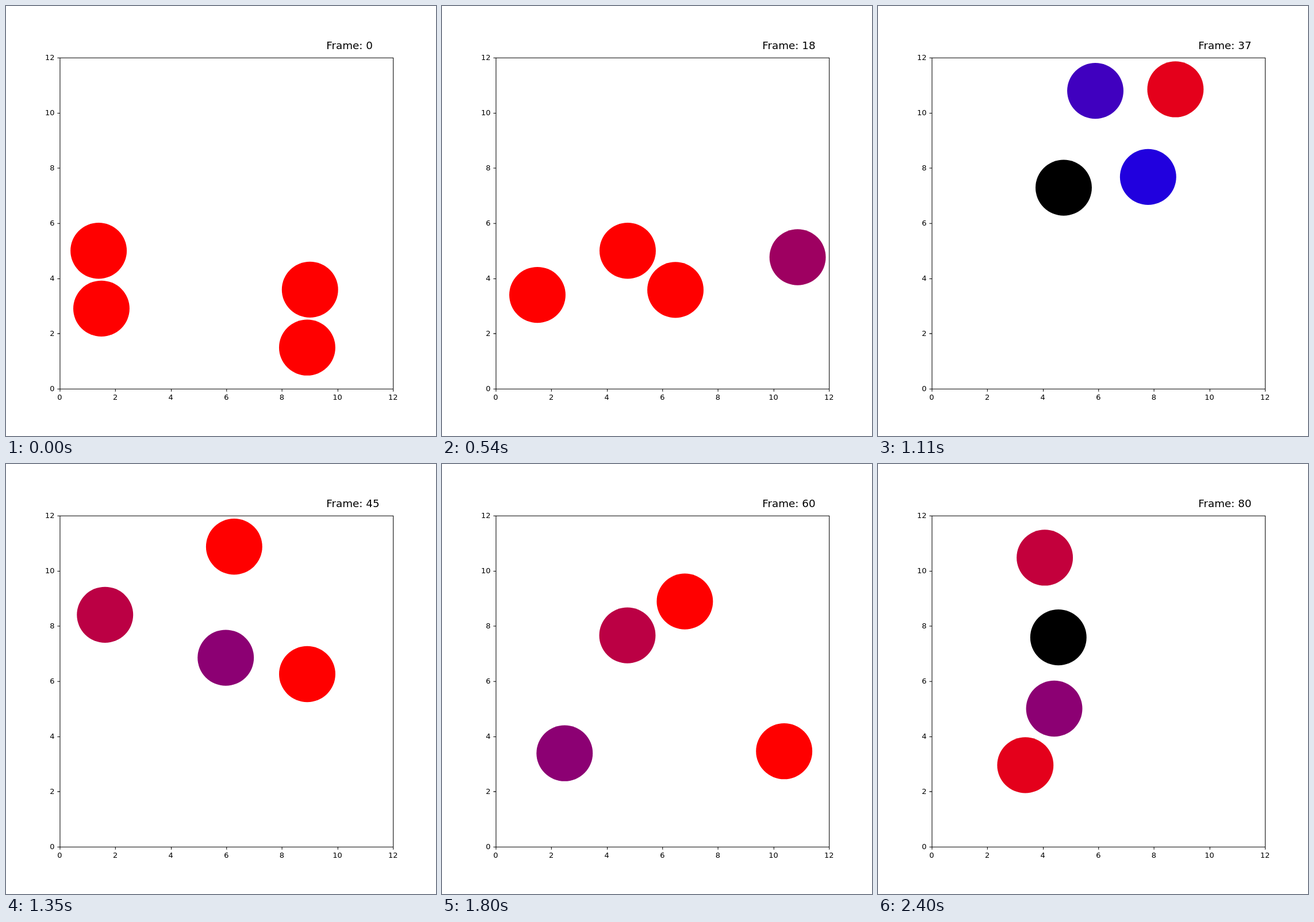
Animation of 748 by 748 pixels, one loop 2430 ms. Source, as an HTML page with a canvas:

```html
<!DOCTYPE html>
<html lang="en">
<head>
<meta charset="utf-8">
<title>Bouncing discs</title>
<style>
  html, body { margin: 0; width: 100%; height: 100%; overflow: hidden; background: #fff; }
  canvas { display: block; }
</style>
</head>
<body>
<canvas id="stage" width="748" height="748"></canvas>
<script>
const ctx = document.getElementById('stage').getContext('2d');
const STEP = 30, COUNT = 81;
const FIGURE = 800, SCALE = 748 / FIGURE;
const LEFT = 100, TOP = 96, WIDTH = 620, HEIGHT = 616, UNITS = 12;
const RADIUS = 1, EDGE = 0.69;
const FONT = '"DejaVu Sans", sans-serif';
const BLACK = -1;

const toX = x => LEFT + x * WIDTH / UNITS;
const toY = y => TOP + HEIGHT - y * HEIGHT / UNITS;
const snap = v => Math.round(v) + 0.5;

// Each leg is a straight run to a point [x, y, blue].
// A point beyond a wall is mirrored back, which makes the bounce.
const legEnds = [0, 18, 26, 37, 52, 69, 80];
const discs = [
  [[1.4, 5, 0], [-2.75, 5, 0], [3.51, 10.215, 10], [5.89, 10.795, 64],
    [6.62, 10.945, 0], [7.02, 6.575, 97], [4.07, 10.475, 60]],
  [[8.91, 1.49, 0], [11.13, -2.765, 97], [9.65, 8.235, 97], [7.79, 14.325, 222],
    [4.39, 6.125, 115], [0.33, 0.305, 115], [4.41, 5.005, 115]],
  [[1.5, 2.905, 0], [1.5, -1.4, 0], [1, 8.635, 0], [4.75, 7.285, BLACK],
    [-1.1, 9.385, 68], [6.585, 5.715, 27], [3.37, -0.955, 27]],
  [[9.01, 3.59, 0], [15.53, 3.58, 0], [7.32, -1.525, 27], [8.775, 10.85, 27],
    [9.03, 2.235, 0], [11.91, -5.615, BLACK], [-2.56, 7.585, BLACK]]
];
discs[0][3][2] = 191;

function fold(v) {
  const low = RADIUS, high = UNITS - RADIUS;
  if (v < low) return 2 * low - v;
  return v > high ? 2 * high - v : v;
}

function stateAt(points, step) {
  const next = Math.max(1, legEnds.findIndex(end => end >= step));
  const from = points[next - 1], to = points[next];
  const k = (step - legEnds[next - 1]) / (legEnds[next] - legEnds[next - 1]);
  const along = axis => fold(fold(from[axis]) + (to[axis] - fold(from[axis])) * k);
  return { x: along(0), y: along(1), blue: (k < 0.5 ? from : to)[2] };
}

function drawDisc(points, step) {
  const { x, y, blue } = stateAt(points, step);
  ctx.fillStyle = blue === BLACK ? '#000' : `rgb(${255 - blue},0,${blue})`;
  ctx.beginPath();
  ctx.ellipse(toX(x), toY(y), RADIUS * WIDTH / UNITS + EDGE,
    RADIUS * HEIGHT / UNITS + EDGE, 0, 0, Math.PI * 2);
  ctx.fill();
}

function label(text, x, y, size, align) {
  ctx.font = `${size}px ${FONT}`;
  ctx.textAlign = align;
  ctx.fillText(text, x, y);
}

function drawAxes() {
  const left = snap(LEFT), bottom = snap(TOP + HEIGHT), tick = 4.86;
  ctx.strokeStyle = ctx.fillStyle = '#000';
  ctx.lineWidth = 1.11;
  ctx.beginPath();
  ctx.rect(left, snap(TOP), WIDTH, HEIGHT);
  for (let v = 0; v <= UNITS; v += 2) {
    const x = snap(toX(v)), y = snap(toY(v));
    ctx.moveTo(x, bottom);
    ctx.lineTo(x, bottom + tick);
    ctx.moveTo(left, y);
    ctx.lineTo(left - tick, y);
    label(v, toX(v), 733, 13.89, 'center');
    label(v, LEFT - 2 * tick, toY(v) + 5, 13.89, 'right');
  }
  ctx.stroke();
}

function draw(step) {
  ctx.setTransform(SCALE, 0, 0, SCALE, 0, 0);
  ctx.fillStyle = '#fff';
  ctx.fillRect(0, 0, FIGURE, FIGURE);
  ctx.save();
  ctx.beginPath();
  ctx.rect(LEFT, TOP, WIDTH, HEIGHT);
  ctx.clip();
  discs.forEach(points => drawDisc(points, step));
  ctx.restore();
  drawAxes();
  label(`Frame: ${step}`, toX(9.6), 80, 19.6, 'left');
}

let start;
function tick(now) {
  start ??= now;
  draw(Math.floor((now - start) / STEP) % COUNT);
  requestAnimationFrame(tick);
}
draw(0);
requestAnimationFrame(tick);
</script>
</body>
</html>
```
